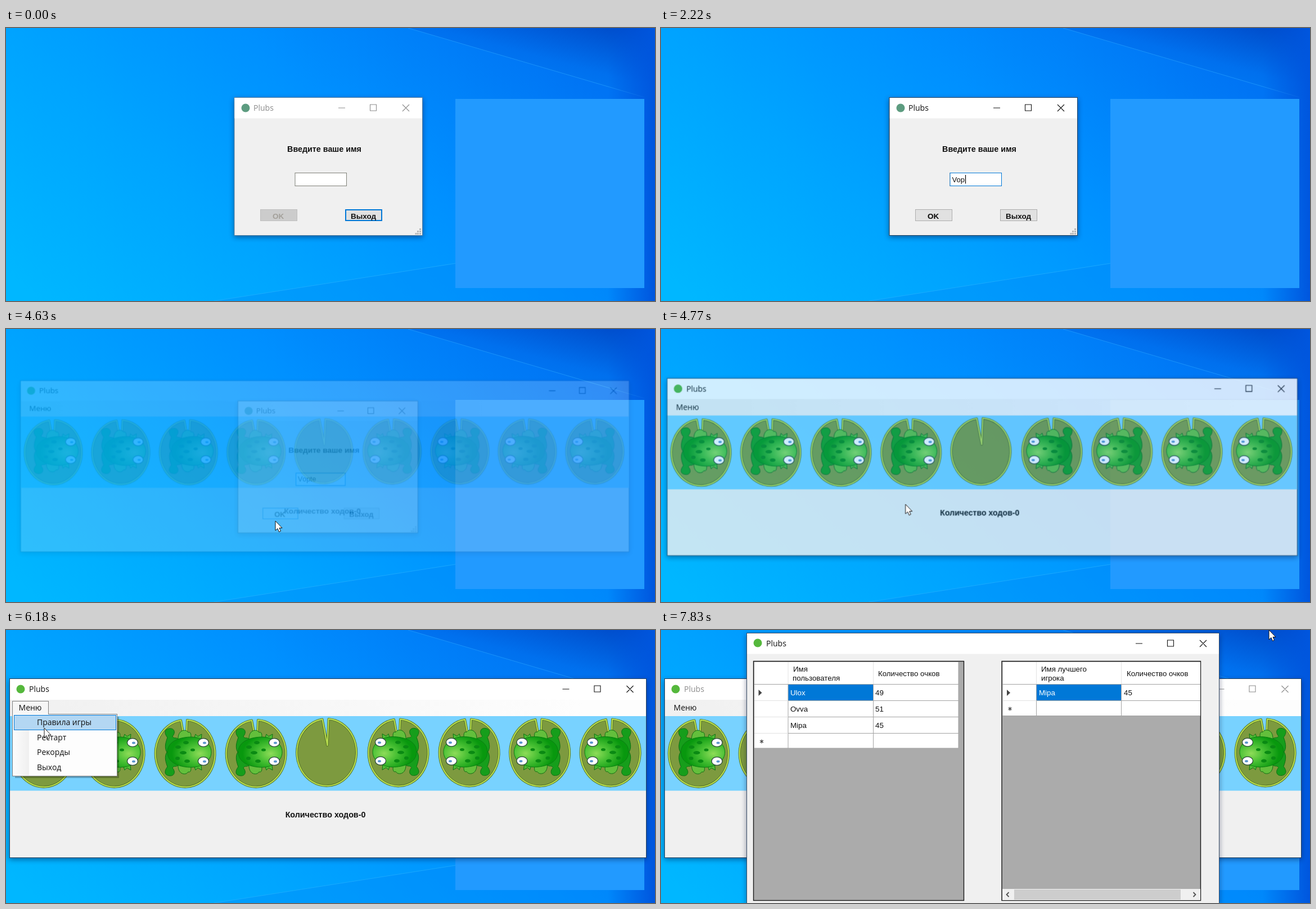
Recreate the animation shown at these times as an HTML page. Size 1154x485 px, loop 8000 ms.

```html
<!DOCTYPE html>
<html lang="ru">
<head>
<meta charset="utf-8">
<title>Plubs</title>
<style>
html, body { margin: 0; width: 100%; height: 100%; overflow: hidden; background: #0098ff; }
svg { display: block; width: 100vw; height: 100vh; }
text { font: 14px "Open Sans", "Noto Sans", sans-serif; fill: #111; }
.bold { font: bold 14.3px "Liberation Sans", sans-serif; text-anchor: middle; }
.small { font-size: 13.5px; }
.typed { font: 13px "Liberation Sans", sans-serif; }
.cells text { font: 13.3px "Liberation Sans", sans-serif; }
.cells .pick { fill: #fff; }
.faded { fill: #8c8c8c; }
.shadow { filter: drop-shadow(0 3px 5px rgba(0, 10, 50, .45)); }
.line { fill: none; stroke: #a3a3a3; }

/* Appears at --at ms, gone again long after its window has closed */
.on { visibility: hidden; animation: on 8s step-end calc(var(--at) * 1ms) infinite; }
@keyframes on { 0% { visibility: visible } 55%, 100% { visibility: hidden } }

#dialog, #main, #scores { transform-origin: 573px 245.5px; animation: 8s linear infinite; }
#dialog { animation-name: dialog; }
@keyframes dialog {
  0%, 56% { opacity: 1; transform: none }
  58.25%, 100% { opacity: 0; transform: translate(-1px, -1px) scale(.949) }
  57.875% { opacity: .17; transform: translate(-1px, -1px) scale(.957) }
}
#main { animation-name: main; }
@keyframes main {
  0%, 57.5% { opacity: 0; transform: translate(-7px, -2px) scale(.945); animation-timing-function: cubic-bezier(.5, 1, .89, 1) }
  61.25%, 100% { opacity: 1; transform: none }
}
#scores { animation-name: scores; }
@keyframes scores {
  0%, 85.375% { opacity: 0; transform: translate(-4px, 0) scale(.945); animation-timing-function: cubic-bezier(.5, 1, .89, 1) }
  89.125%, 100% { opacity: 1; transform: none }
}

#caret { animation: caret 8s step-end infinite; }
@keyframes caret {
  0% { opacity: 0; transform: translateX(0) }
  12.125% { opacity: 1; transform: translateX(0) }
  19.125% { opacity: 1; transform: translateX(9px) }
  23% { opacity: 1; transform: translateX(16px) }
  27.75% { opacity: 1; transform: translateX(23px) }
  30.875% { opacity: 1; transform: translateX(27px) }
  34.875% { opacity: 1; transform: translateX(34px) }
  41.875% { opacity: 0; transform: translateX(34px) }
  48.5% { opacity: 1; transform: translateX(34px) }
  54.75%, 100% { opacity: 0; transform: translateX(34px) }
}

#hover { animation: hover 8s step-end infinite; }
@keyframes hover { 0% { opacity: 0 } 68% { opacity: 1 } 85.375%, 100% { opacity: 0 } }
#menu { animation: menu 8s linear infinite; }
@keyframes menu { 0%, 70% { opacity: 0 } 71.5%, 85.3% { opacity: 1 } 85.4%, 100% { opacity: 0 } }
#row { animation: row 8s step-end infinite; }
@keyframes row {
  0% { opacity: 0; transform: none }
  75.5% { opacity: 1; transform: none }
  77.75% { opacity: 1; transform: translateY(26.6px) }
  80.75%, 100% { opacity: 1; transform: translateY(53.2px) }
}

#beam { animation: beam 8s linear infinite, beamShow 8s step-end infinite; }
@keyframes beam {
  0%, 10.4% { transform: translate(598px, 269px) }
  12%, 19.125% { transform: translate(578px, 268.5px) }
  19.13%, 45% { transform: translate(549px, 268px) }
  47.5%, 100% { transform: translate(540px, 278px) }
}
@keyframes beamShow {
  0% { opacity: 0 } 10.4% { opacity: 1 } 19.125% { opacity: 0 }
  45% { opacity: 1 } 47.5%, 100% { opacity: 0 }
}
#arrow { animation: arrow 8s linear infinite, arrowShow 8s step-end infinite; }
@keyframes arrow {
  0%, 2.375% { transform: translate(953px, 413px) }
  5% { transform: translate(850px, 370px) }
  7.5% { transform: translate(700px, 305px) }
  10.4% { transform: translate(598px, 270px) }
  47.5% { transform: translate(538px, 282px) }
  50% { transform: translate(505px, 322px) }
  52.5%, 58.5% { transform: translate(479px, 341px) }
  61.375% { transform: translate(367px, 266px) }
  65.125% { transform: translate(194px, 240px) }
  69.125%, 74.5% { transform: translate(45px, 142px) }
  77.25% { transform: translate(68px, 174px) }
  83%, 94.75% { transform: translate(95px, 220px) }
  97.75%, 100% { transform: translate(1081px, 0) }
}
@keyframes arrowShow {
  0% { opacity: 0 } 2.375% { opacity: 1 } 10.4% { opacity: 0 } 47.5%, 100% { opacity: 1 }
}
</style>
</head>
<body>
<svg viewBox="0 0 1154 485" preserveAspectRatio="none">
<defs>
  <linearGradient id="sky" x1="0" y1=".9" x2="1" y2=".4">
    <stop offset="0" stop-color="#00b7ff"/><stop offset=".35" stop-color="#00a4ff"/>
    <stop offset=".65" stop-color="#0090ff"/><stop offset="1" stop-color="#0074f4"/>
  </linearGradient>
  <linearGradient id="dusk" x1=".1" y1="1" x2="1" y2="0">
    <stop offset="0" stop-color="#0088fc"/><stop offset=".55" stop-color="#0070ee"/><stop offset="1" stop-color="#0046c4"/>
  </linearGradient>
  <linearGradient id="edge">
    <stop offset="0" stop-color="#0056de" stop-opacity="0"/><stop offset="1" stop-color="#0056de"/>
  </linearGradient>
  <linearGradient id="strip">
    <stop offset="0" stop-color="#f0f0f0"/><stop offset=".9" stop-color="#fdfdfd"/>
  </linearGradient>
  <linearGradient id="gutter">
    <stop offset="0" stop-color="#fcfcfc"/><stop offset="1" stop-color="#efefef"/>
  </linearGradient>
  <radialGradient id="skin" cx=".74" cy=".55" r=".64">
    <stop offset="0" stop-color="#8edc58"/><stop offset=".45" stop-color="#48c034"/><stop offset="1" stop-color="#08980e"/>
  </radialGradient>

  <!-- Caption buttons, measured from the top right corner -->
  <path id="buttons" fill="none" stroke-width="1.1" d="M-149,18.500h12M-92.500,12.500h11v11h-11zM-35,12.500l12,12m0,-12l-12,12"/>

  <path id="leaf" d="M2,-59A53,59.500 0 1 1 -9,-58.500L0,-12Z"/>
  <g id="pad" stroke-linejoin="round">
    <use href="#leaf" fill="#7d9a3f" stroke="#4d6b1f" stroke-width="4"/>
    <use href="#leaf" fill="none" stroke="#b5da4e" stroke-width="2.300"/>
  </g>
  <g id="limbs" stroke="#0d6f12">
    <path fill="#169e1b" d="M-8,-18C-18,-30 -20,-22 -24,-28C-17,-36 -22,-43 -29,-42C-40,-41 -38,-32 -33,-26C-36,-18 -39,-8 -34,0L-10,0Z"/>
    <path fill="#63bf3c" d="M-14,-22C-15,-40 0,-42 4,-35C9,-37 10,-30 8,-22Z"/>
    <path fill="#50bd35" d="M14,-23L17,-32L21,-28L28,-32L27,-22Z"/>
  </g>
  <g id="eye">
    <ellipse rx="9.500" ry="7.300" fill="#fff" stroke="#2b4a3a" stroke-width="1.300"/>
    <ellipse cx="2" cy=".5" rx="3" ry="2" fill="#5b95cc"/>
  </g>
  <g id="frog">
    <use href="#limbs"/><use href="#limbs" transform="scale(1,-1)"/>
    <path fill="url(#skin)" stroke="#0b7d12" d="M-33,0C-33,-20 -10,-27 10,-27C32,-26 45,-14 45,0C45,14 32,26 10,27C-10,27 -33,20 -33,0Z"/>
    <g fill="#0a8a13">
      <ellipse cx="-14" cy="-9" rx="5" ry="3"/><ellipse cx="0" cy="-17" rx="5" ry="3"/>
      <ellipse cx="-5" cy="1" rx="6" ry="3"/><ellipse cx="-15" cy="11" rx="4" ry="3"/>
      <ellipse cx="2" cy="16" rx="5" ry="3"/><ellipse cx="12" cy="-4" rx="4" ry="2.500"/>
    </g>
    <use href="#eye" x="31" y="-17"/><use href="#eye" x="31" y="16"/>
  </g>
  <g id="right"><use href="#pad"/><use href="#frog" y="-2"/></g>
  <g id="left"><use href="#pad"/><use href="#frog" transform="translate(-2,-1) scale(-1,1)"/></g>

  <path id="grip" fill="#b8b8b8" d="M735,356h3v3h-3zM731,360h3v3h-3zM735,360h3v3h-3zM727.500,364h3v3h-3zM731,364h3v3h-3zM735,364h3v3h-3z"/>
  <path id="current" fill="#444" d="M0,0l6,5.500l-6,5.500z"/>
  <path id="star" stroke="#444" stroke-width="1.200" d="M0,-3.500v7M-3,-2l6,4m0,-4l-6,4"/>
</defs>

<!-- Desktop -->
<rect width="1154" height="485" fill="url(#sky)"/>
<path d="M715,0H1154V130L1135,123Z" fill="url(#dusk)"/>
<path d="M715,0L1135,123" stroke="#2ba4ff" stroke-opacity=".6"/>
<path d="M370,485L800,418H1154V485Z" fill="#0080f4" fill-opacity=".3"/>
<path d="M370,485L800,418" stroke="#2cb4ff" stroke-opacity=".6"/>
<rect x="1070" width="84" height="485" fill="url(#edge)"/>
<rect x="799" y="126" width="336" height="336" fill="#229aff"/>

<!-- Game window -->
<g id="main">
  <rect class="shadow" x="6.500" y="86.500" width="1132" height="318" fill="#f0f0f0" stroke="#27425c"/>
  <rect x="7" y="87" width="1131" height="37" fill="#fff"/>
  <circle cx="26" cy="105" r="7.500" fill="#55b83c"/>
  <text x="41" y="110">Plubs</text>
  <use href="#buttons" x="1138.500" y="86.500" stroke="#111"/>
  <g class="on" style="--at:6830">
    <rect x="40" y="90" width="1095" height="32" fill="#fff"/>
    <text class="faded" x="41" y="110">Plubs</text>
    <use href="#buttons" x="1138.500" y="86.500" stroke="#8c8c8c"/>
  </g>
  <rect x="7" y="124" width="1131" height="29" fill="url(#strip)"/>
  <rect id="hover" x="11.500" y="126.500" width="64" height="24" fill="#b3d7f3" stroke="#0078d7"/>
  <text x="22.500" y="143">Меню</text>
  <rect x="7" y="153" width="1131" height="132.500" fill="#78d2ff"/>
  <use href="#right" x="68.500" y="219"/><use href="#right" x="194" y="219"/>
  <use href="#right" x="320" y="219"/><use href="#right" x="446" y="219"/>
  <use href="#pad" x="571.500" y="217"/>
  <use href="#left" x="699" y="217.500"/><use href="#left" x="825" y="217.500"/>
  <use href="#left" x="950.500" y="217.500"/><use href="#left" x="1076" y="217.500"/>
  <text class="bold" x="568" y="333">Количество ходов-0</text>

  <g id="menu">
    <rect x="16" y="154" width="185" height="109" fill="#000" fill-opacity=".25"/>
    <rect x="11.500" y="126.500" width="64" height="26" fill="#f6f6f6" stroke="#808080"/>
    <text x="22.500" y="143">Меню</text>
    <rect x="11.500" y="149.500" width="186" height="110" fill="#fdfdfd" stroke="#808080"/>
    <path d="M12,149.500h63" stroke="#f6f6f6" stroke-width="1.500"/>
    <rect x="13" y="151" width="28" height="107" fill="url(#gutter)"/>
    <rect id="row" x="14.500" y="151.500" width="181" height="26" fill="#b3d7f3" stroke="#0078d7"/>
    <text x="55" y="169">Правила игры</text>
    <text x="55" y="196">Рестарт</text>
    <text x="55" y="222">Рекорды</text>
    <text x="55" y="249">Выход</text>
  </g>
</g>

<!-- Name dialog -->
<g id="dialog">
  <rect class="shadow" x="406" y="123.500" width="334.500" height="245" fill="#f0f0f0" stroke="#5a7f9c"/>
  <rect x="406.500" y="124" width="333.500" height="36.500" fill="#fff"/>
  <circle cx="426" cy="142" r="7.500" fill="#5d9c80"/>
  <text class="faded" x="440" y="147">Plubs</text>
  <use href="#buttons" x="740" y="123.500" stroke="#8c8c8c"/>
  <use href="#grip"/>
  <rect x="514" y="257.500" width="91.500" height="23" fill="#fff" stroke="#7f8078"/>
  <rect x="452.500" y="322.500" width="65" height="20" fill="#ccc" stroke="#bfbfbf"/>
  <rect x="604" y="323" width="64" height="19" fill="#e1e1e1" stroke="#0078d7" stroke-width="2"/>
  <g class="on" style="--at:970">
    <rect x="406" y="123.500" width="334.500" height="245" fill="none" stroke="#27425c"/>
    <rect x="438" y="126" width="300" height="32" fill="#fff"/>
    <text x="440" y="147">Plubs</text>
    <use href="#buttons" x="740" y="123.500" stroke="#111"/>
    <rect x="602" y="321" width="68" height="23" fill="#f0f0f0"/>
    <rect x="603.500" y="322.500" width="65" height="20" fill="#e1e1e1" stroke="#adadad"/>
  </g>
  <rect class="on" style="--at:1030" x="514" y="257.500" width="91.500" height="23" fill="#fff" stroke="#0078d7"/>
  <rect class="on" style="--at:1530" x="452.500" y="322.500" width="65" height="20" fill="#e1e1e1" stroke="#adadad"/>
  <rect class="on" style="--at:4000" x="452.500" y="322.500" width="65" height="20" fill="#e5f1fb" stroke="#0078d7"/>
  <text class="bold" x="566" y="219.500">Введите ваше имя</text>
  <text class="bold small" x="484" y="338.500" style="fill:#a3a09a">OK</text>
  <text class="bold small on" style="--at:1530" x="484" y="338.500">OK</text>
  <text class="bold small" x="635.500" y="338.500">Выход</text>
  <text class="typed" x="517.500" y="273.500"><tspan class="on" style="--at:1530">V</tspan><tspan class="on" style="--at:1840">o</tspan><tspan class="on" style="--at:2220">p</tspan><tspan class="on" style="--at:2470">t</tspan><tspan class="on" style="--at:2790">e</tspan></text>
  <path id="caret" d="M518.500,261v15.500" stroke="#000" stroke-width="1.200"/>
</g>

<!-- High scores -->
<g id="scores">
  <rect class="shadow" x="152.500" y="5.500" width="840" height="480" fill="#f0f0f0" stroke="#3c5068"/>
  <rect x="153" y="6" width="839" height="36.500" fill="#fff"/>
  <circle cx="172" cy="23" r="7.500" fill="#55b83c"/>
  <text x="187" y="28.500">Plubs</text>
  <use href="#buttons" x="993" y="5.500" stroke="#111"/>

  <g class="cells">
    <rect x="164.500" y="55.500" width="374" height="425" fill="#ababab" stroke="#1a1a1a" stroke-width="1.400"/>
    <rect x="166" y="57" width="363" height="153" fill="#fff"/>
    <rect x="226" y="97" width="151" height="28" fill="#0078d7"/>
    <path class="line" d="M166,96.500H529M226,125.500H529M226,154.500H529M226,183.500H529M166,210H529M226,96V210M377.500,96V210M529,57V210"/>
    <path d="M166,125.500h60m-60,29h60m-60,29h60M226,57v39M377.500,57v39" stroke="#e2e2e2"/>
    <use href="#current" x="173.500" y="106"/><use href="#star" x="179" y="198"/>
    <text x="235" y="74">Имя</text><text x="234" y="90">пользователя</text>
    <text x="386" y="82">Количество очков</text>
    <text class="pick" x="230" y="116">Ulox</text><text x="381" y="116">49</text>
    <text x="230" y="145">Ovva</text><text x="381" y="145">51</text>
    <text x="230" y="174">Mipa</text><text x="381" y="174">45</text>
  </g>

  <g class="cells">
    <rect x="606" y="55.500" width="353.500" height="425" fill="#ababab" stroke="#1a1a1a" stroke-width="1.400"/>
    <rect x="607.500" y="57" width="351.500" height="95" fill="#fff"/>
    <rect x="667.500" y="97" width="151" height="28" fill="#0078d7"/>
    <path class="line" d="M607.500,96.500H959M667.500,125.500H959M607.500,152.500H959M667.500,96V152M818.500,96V152"/>
    <path d="M607.500,125.500h60M667.500,57v39M818.500,57v39" stroke="#e2e2e2"/>
    <use href="#current" x="615" y="106"/><use href="#star" x="620.500" y="140"/>
    <text x="676" y="74">Имя лучшего</text><text x="676" y="90">игрока</text>
    <text x="828" y="82">Количество очков</text>
    <text class="pick" x="672" y="116">Mipa</text><text x="823" y="116">45</text>
    <rect x="607" y="460" width="352" height="20" fill="#f0f0f0"/>
    <rect x="628" y="461" width="296" height="18" fill="#cdcdcd"/>
    <path d="M618.500,466l-4,4l4,4M946.500,466l4,4l-4,4" fill="none" stroke="#505050" stroke-width="1.800"/>
  </g>
</g>

<!-- Pointers -->
<path id="beam" d="M-3.500,-8H-1L0,-7L1,-8H3.500M0,-7V7M-3.500,8H-1L0,7L1,8H3.500" fill="none" stroke="#111"/>
<path id="arrow" d="M0,0V17L4,13.500L6.500,19.500L9.500,18L7,12.500H12Z" fill="#fff" stroke="#111"/>
</svg>
</body>
</html>
```
